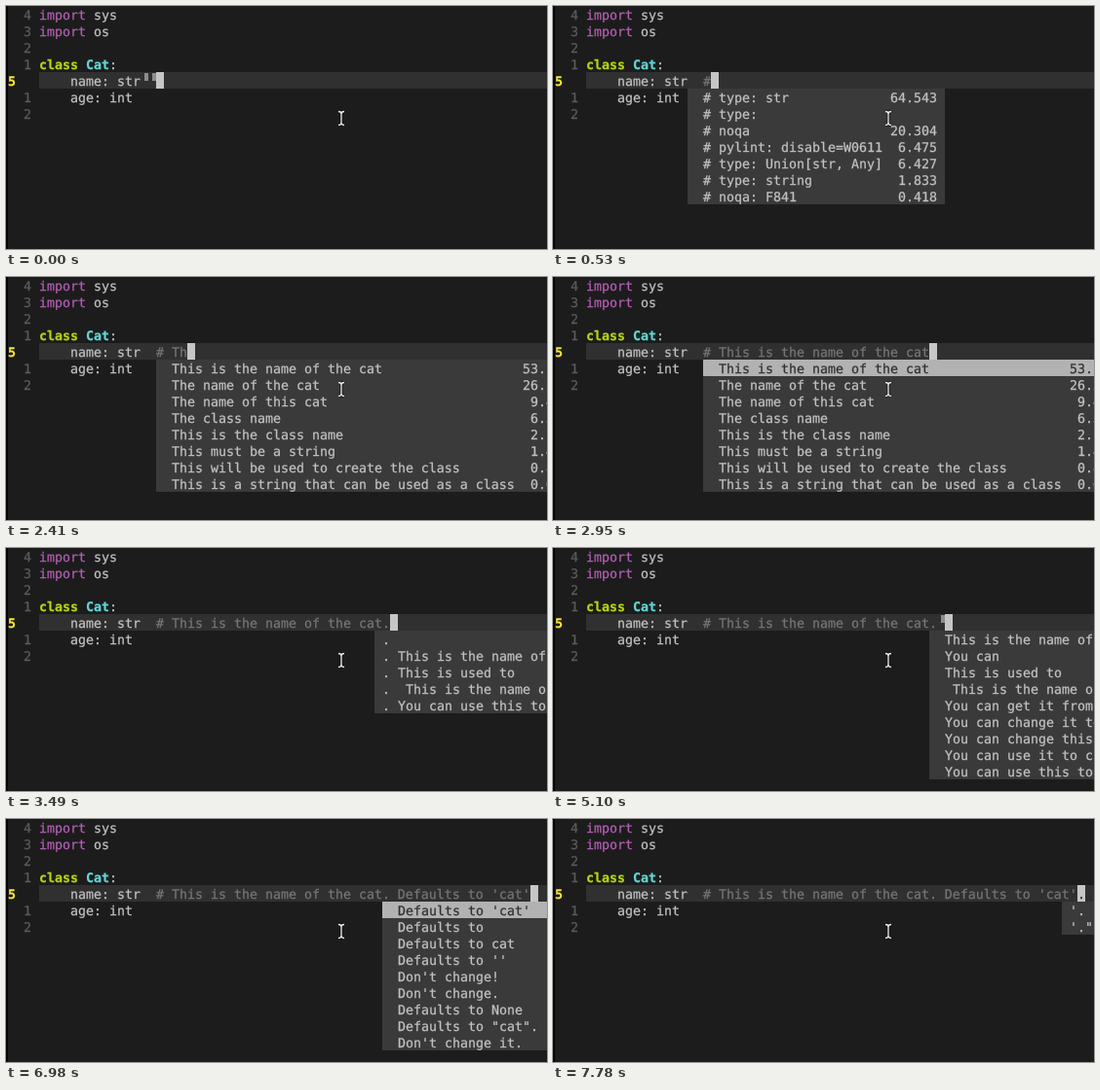
Animation of 555 by 250 pixels, one loop 8000 ms. Source, as an HTML page:

```html
<!DOCTYPE html>
<html lang="en">
<head>
<meta charset="utf-8">
<title>Comment completion</title>
<style>
  html, body { margin: 0; width: 100%; height: 100%; overflow: hidden; background: #1c1c1c; }
  svg { display: block; width: 555px; height: 250px; }
  text {
    font: 13.29px "DejaVu Sans Mono", monospace;
    white-space: pre;
    text-rendering: geometricPrecision;
    stroke-width: .25px;
  }
</style>
</head>
<body>
<svg id="stage" viewBox="0 0 555 250" xmlns="http://www.w3.org/2000/svg">
  <defs>
    <path id="beam" fill="none" d="M341 108.5q3 0 3 2.5q0-2.5 3-2.5M344 111v9M341 122.5q3 0 3-2.5q0 2.5 3 2.5"/>
  </defs>
  <rect width="555" height="250" fill="#1c1c1c"/>
  <rect x="34" y="68" width="521" height="17" fill="#303030"/>
  <rect width="2" height="250" fill="#050505"/>
  <g id="code"></g>
  <g id="live"></g>
  <use href="#beam" stroke="#111" stroke-width="2.8"/>
  <use href="#beam" stroke="#f0f0f0" stroke-width="1.3"/>
</svg>
<script>
const CELL = 8, ROW = 17, LEFT = 34, LINE = 4, LOOP = 8000;
const GREY = '#c2c2c2', DIM = '#5c5c5c', PINK = '#b45fb4', COMMENT = '#767676';
const code = document.getElementById('code');
const live = document.getElementById('live');

const colX = col => LEFT + col * CELL;
const escape = s => s.replace(/&/g, '&amp;').replace(/</g, '&lt;');
const rect = (x, y, w, h, fill) =>
  `<rect x="${x}" y="${y}" width="${w}" height="${h}" fill="${fill}"/>`;
const text = (x, row, s, fill = GREY, weight = 400) =>
  `<text x="${x}" y="${row * ROW + 14}" fill="${fill}" stroke="${fill}" style="font-weight:${weight}">${escape(s)}</text>`;

code.innerHTML =
  ['4', '3', '2', '1', '', '1', '2'].map((n, row) => text(18, row, n, DIM)).join('') +
  text(2, LINE, '5', '#f5e63c', 700) +
  text(colX(0), 0, 'import', PINK) + text(colX(7), 0, 'sys') +
  text(colX(0), 1, 'import', PINK) + text(colX(7), 1, 'os') +
  text(colX(0), 3, 'class', '#b4d610', 700) + text(colX(6), 3, 'Cat', '#62d6d6', 700) + text(colX(9), 3, ':') +
  text(colX(4), LINE, 'name: str') +
  text(colX(4), 5, 'age: int');

// Each popup: left column, items as "label|score", optional right edge.
const hints = ['type: str|64.543', 'type:', 'noqa|20.304', 'pylint: disable=W0611|6.475',
  'type: Union[str, Any]|6.427', 'type: string|1.833', 'noqa: F841|0.418'];
const hashed = hints.map(s => ' # ' + s);
const popups = {
  first: { col: 13, items: hashed.slice(0, 6), right: 402 },
  hash: { col: 13, items: hashed, right: 402 },
  hints: { col: 15, items: hints.map(s => ' ' + s), right: 402 },
  names: { col: 15, right: 586, items: [
    ' This is the name of the cat|53.112', ' The name of the cat|26.204', ' The name of this cat|9.418',
    ' The class name|6.305', ' This is the class name|2.117', ' This must be a string|1.406',
    ' This will be used to create the class|0.812', ' This is a string that can be used as a class|0.644'] },
  stops: { col: 43, items: ['.', '. This is the name of the cat', '. This is used to',
    '.  This is the name of the cat', '. You can use this to'] },
  more: { col: 44, items: [' This is the name of the cat', ' You can', ' This is used to',
    '  This is the name of the cat', ' You can get it from', ' You can change it to',
    ' You can change this', ' You can use it to create', ' You can use this to'] },
  defaults: { col: 44, items: [" Defaults to 'cat'", ' Defaults to', ' Defaults to cat', " Defaults to ''",
    " Don't change!", " Don't change.", ' Defaults to None', ' Defaults to "cat".', " Don't change it."] },
  quote: { col: 61, items: ["'.", "'.\""] }
};

// Time, text after "str", popup, selected row, cursor shift.
const name = '  # This is the name of the cat';
const full = name + ". Defaults to 'cat'";
const steps = [
  [0, '  '],
  [260, '  ', 'first'],
  [530, '  #', 'hash'],
  [1340, '  # ', 'hash'],
  [1610, '  # ', 'hints'],
  [1880, '  # Th', 'hints'],
  [2410, '  # Th', 'names'],
  [2950, name, 'names', 0],
  [3220, name + '.'],
  [3490, name + '.', 'stops'],
  [5100, name + '. ', 'more'],
  [6180, name + '. D', 'more'],
  [6440, name + '. D', 'defaults'],
  [6980, full, 'defaults', 0],
  [7520, full + '.', 'defaults'],
  [7780, full + '.', 'quote', -1, -1]
];

function drawPopup({ col, items, right = 555 }, selected) {
  const x = colX(col), top = (LINE + 1) * ROW;
  let out = rect(x, top, right - x, items.length * ROW, '#3a3a3a');
  items.forEach((item, i) => {
    const row = LINE + 1 + i, on = i === selected;
    const [label, score = ''] = item.split('|');
    if (on) out += rect(x, row * ROW, right - x, ROW, '#b2b2b2');
    const fill = on ? '#303030' : GREY;
    out += text(x + CELL, row, label, fill);
    if (score) out += text(right - CELL * (score.length + 1), row, score, fill);
  });
  return out;
}

function drawLine(typed, shift) {
  const y = LINE * ROW, start = 13, end = start + typed.length, cursor = end + shift;
  let out = text(colX(start), LINE, typed, COMMENT);
  // Trailing spaces show as small blocks.
  for (let i = typed.trimEnd().length; i < typed.length; i++)
    out += rect(colX(start + i) + 4, y + 1, 4, 8, '#8c8c8c');
  out += rect(colX(cursor), y, CELL, ROW, '#c6c6c6');
  if (shift < 0) out += text(colX(cursor), LINE, typed.at(shift), '#303030');
  return out;
}

let shown = null;
function render(ms) {
  const step = steps.findLast(s => s[0] <= ms);
  if (step === shown) return;
  shown = step;
  const [, typed, popup, selected = -1, shift = 0] = step;
  live.innerHTML = drawLine(typed, shift) + (popup ? drawPopup(popups[popup], selected) : '');
}

const begin = performance.now();
function tick() {
  render((performance.now() - begin) % LOOP);
  requestAnimationFrame(tick);
}
tick();
</script>
</body>
</html>
```
